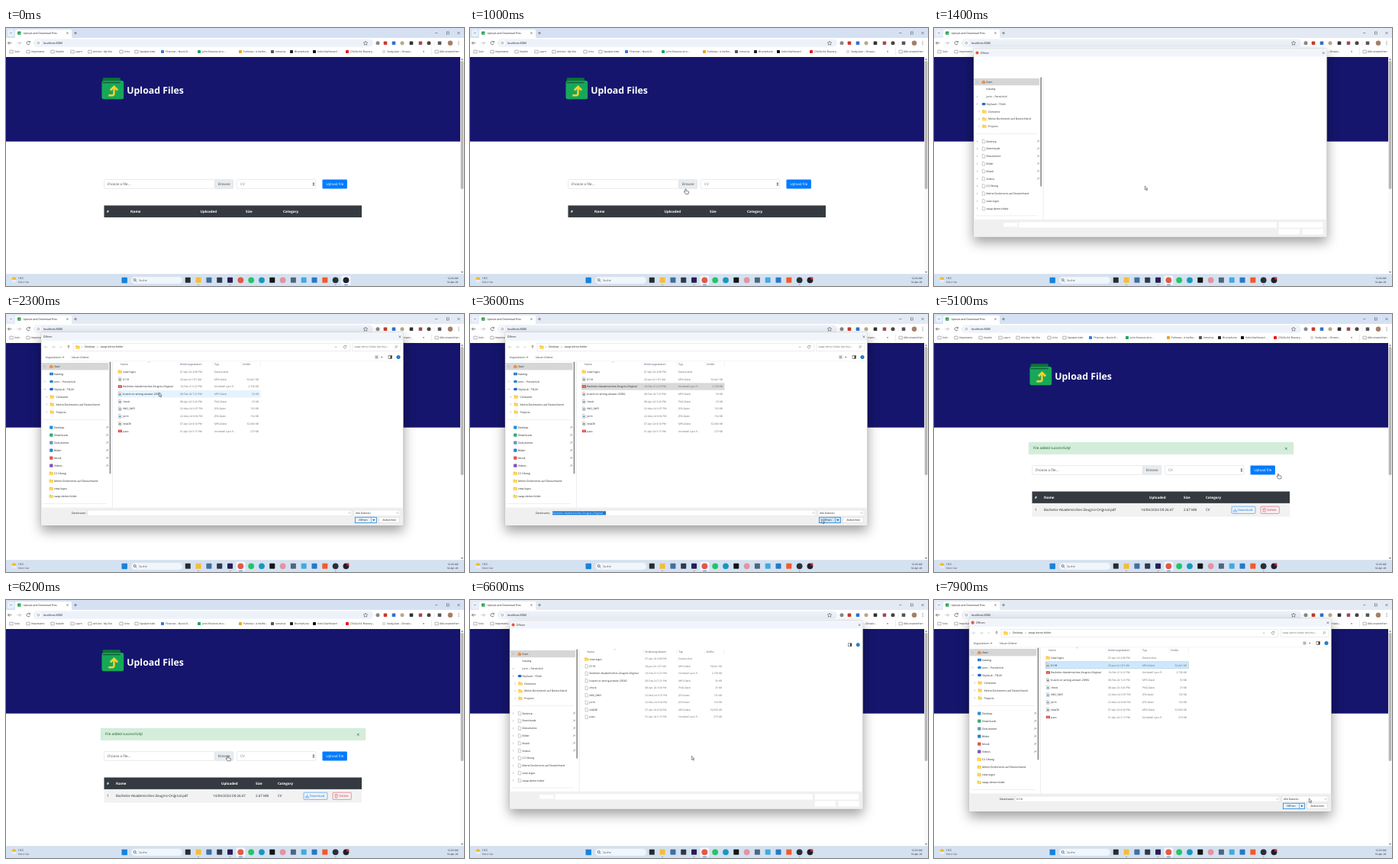
Animation of 600 by 338 pixels, one loop 8000 ms. Source, as an HTML page:

```html
<!DOCTYPE html>
<html lang="de">
<head>
<meta charset="utf-8">
<title>Upload and Download Files</title>
<style>
  html, body { margin: 0; width: 100%; height: 100%; overflow: hidden; background: #fff; }
  svg { display: block; width: 100%; height: 100%; }
  text { font-family: "Open Sans", "Noto Sans", sans-serif; text-rendering: geometricPrecision; white-space: pre; }
  #window { filter: drop-shadow(0 7px 8px rgba(0, 0, 0, .38)); }
</style>
</head>
<body>
<svg id="stage" viewBox="0 0 600 338" xmlns="http://www.w3.org/2000/svg"></svg>
<script>
const LOOP = 8000, STEP = 100;

// Drawing helpers; text is placed by its vertical middle.
const text = (x, y, s, size = 3.5, fill = '#222', extra = '') =>
  `<text x="${x}" y="${y + size * .36}" font-size="${size}" fill="${fill}" ${extra}>${s}</text>`;
const rect = (x, y, w, h, fill, extra = '') =>
  `<rect x="${x}" y="${y}" width="${w}" height="${h}" fill="${fill}" ${extra}/>`;
const dot = (x, y, r, fill, extra = '') => `<circle cx="${x}" cy="${y}" r="${r}" fill="${fill}" ${extra}/>`;
const line = (d, stroke = '#444', w = .6, extra = '') =>
  `<path d="${d}" fill="none" stroke="${stroke}" stroke-width="${w}" ${extra}/>`;
const group = (id, body, extra = '') => `<g id="${id}" ${extra}>${body}</g>`;
const cross = (x, y, r = 1.6, c = '#333', w = .5) => line(`M${x - r} ${y - r}l${2 * r} ${2 * r}m0 ${-2 * r}l${-2 * r} ${2 * r}`, c, w);
const right = (x, y) => line(`M${x - .6} ${y - 1.1}l1.1 1.1l-1.1 1.1`, '#777', .45);
const down = (x, y, c = '#666', r = 1.2) => line(`M${x - r} ${y - r / 2}l${r} ${r}l${r} ${-r}`, c, .5);
const folder = (x, y) => `<path d="M${x - 2.6} ${y - 2.1}h2l.7 .7h2.5v3.6h-5.2z" fill="#f7c331"/>` + rect(x - 2.6, y - .7, 5.2, 2.9, '#ffd75e', 'rx=".4"');
const sheet = (x, y) => `<path d="M${x - 1.7} ${y - 2.4}h2.3l1.2 1.2v3.6h-3.5z" fill="#fff" stroke="#777" stroke-width=".4"/>`;
const square = (x, y, s, fill) => rect(x - s / 2, y - s / 2, s, s, fill, 'rx=".7"');
const bold = 'font-weight="600"', end = 'text-anchor="end"', mid = 'text-anchor="middle"';

function browser() {
  const bookmarks = [
    [11, 'Solo'], [33, 'Importante'], [65, 'Vaivém'], [91, 'Learn'], [114, 'Articles - My Site'],
    [155, 'Univ'], [175, 'Speakerclubs'], [209, 'Finances – Nuvio D...', '#3478e5'],
    [257, 'jorin-finances.stru...', '#1ea362'], [311, 'Parlenza - A melho...', '#f0a51e'],
    [353, 'lumeiras', '#555'], [378, 'BrumaKurse', '#222'], [408, 'Velto Dashboard', '#111'],
    [451, '(74) Ep 64. Bravery...', '#f01616'], [499, 'Study plan – Ortavis...', '#ddd']
  ];
  const tools = [[487, '#888'], [497, '#c63b32'], [508, '#2d73d2'], [519, '#b6a989'], [531, '#2f3137'], [543, '#a34b54'], [554, '#444'], [568, '#555']];
  return rect(0, 0, 600, 14, '#d5e1f3', 'id="strip"') +
    rect(2, 2, 9, 9, '#e9f0fa', 'rx="2.5"') + down(6.5, 6.5, '#333') +
    '<path d="M10 14q2 0 2-2V4q0-2 2-2h70q2 0 2 2v8q0 2 2 2z" fill="#fff"/>' +
    square(17.4, 6.6, 4.4, '#179c52') + line('M16.5 7.5h2v-2', '#f5c72b', .7) +
    text(22.5, 6.6, 'Upload and Download Files', 3.5) + cross(80.5, 6.6, 1.2) +
    line('M89 6.6h4m-2-2v4', '#333', .5) +
    line('M562 6.6h3.4', '#333', .45) + rect(577.2, 5, 3, 3, 'none', 'stroke="#333" stroke-width=".45"') + cross(593, 6.6, 1.5) +
    rect(0, 13, 600, 25, '#fff') +
    line('M7.5 19.7h-5m2-2l-2 2l2 2', '#444', .65) + line('M14.5 19.7h5m-2-2l2 2l-2 2', '#aaa', .65) +
    line('M31 18.3a2.2 2.2 0 1 0 .3 2.2M31.4 16.9v1.8h-1.8', '#444', .65) +
    rect(36, 14.6, 445, 10.2, '#edf2fa', 'rx="5.1"') + dot(42.3, 19.7, 3.4, '#fff') +
    dot(42.3, 19.7, 1.5, 'none', 'stroke="#555" stroke-width=".5"') + text(48.8, 19.7, 'localhost:8080', 3.75) +
    '<path d="M471 17l.8 1.8l2 .2l-1.5 1.3l.5 2l-1.8-1l-1.8 1l.5-2l-1.5-1.3l2-.2z" fill="none" stroke="#444" stroke-width=".5"/>' +
    tools.map(([x, c], i) => i % 3 ? square(x, 19.7, 4.6, c) : dot(x, 19.7, 2.5, c)).join('') +
    line('M561 16.5v6.5', '#cbd8ec', .5) + dot(582, 19.7, 3.2, '#a47f67') +
    [17.7, 19.7, 21.7].map(y => dot(593, y, .5, '#444')).join('') +
    bookmarks.map(([x, s, c]) => (c ? square(x - 4, 31, 4, c)
      : rect(x - 6.2, 29.2, 4.4, 3.7, 'none', 'rx=".4" stroke="#666" stroke-width=".5"')) + text(x, 31, s, 3.3)).join('') +
    text(546, 30.6, '»', 4.5) + line('M557.5 26.5v9', '#cbd8ec', .5) +
    rect(562, 29.2, 4.4, 3.7, 'none', 'rx=".4" stroke="#666" stroke-width=".5"') + text(568, 31, 'Alle Lesezeichen', 3.35);
}

function heads(xs) {
  return ['#', 'Name', 'Uploaded', 'Size', 'Category']
    .map((s, i) => text(xs[i], 240.3, s, 4.5, '#fff', 'font-weight="700"')).join('');
}

function page() {
  const trayIcon = (x, y, c) => line(`M${x - 2} ${y + .5}v1.8h4v-1.8M${x} ${y - 2}v3.2m-1-1l1 1l1-1`, c, .5);
  const added = rect(124, 168, 347, 15.7, '#d4edda', 'rx="1" stroke="#c3e6cb" stroke-width=".3"') +
    text(130, 175.8, 'File added successfully!', 4.55, '#155724') + cross(461.3, 176.3, 1.4, '#4f7059', .8) +
    heads([132, 144, 282, 327, 356]) + rect(128.5, 248, 337.5, 17, '#f2f2f2') + line('M128.5 248.2h337.5m0 16.7h-337.5', '#dee2e6', .4) +
    [[132, '1'], [144, 'Bachelor-Akademisches-Zeugnis-Original.pdf'], [271, '14/04/2024 00:26:47'], [327, '2.67 MB'], [356, 'CV']]
      .map(([x, s]) => text(x, 256.2, s, 4.5, '#212529')).join('') +
    rect(390, 252.2, 31, 9.2, 'none', 'rx="1" stroke="#007bff" stroke-width=".5"') + trayIcon(394.5, 256.8, '#007bff') +
    text(398, 256.8, 'Download', 4.1, '#007bff') +
    rect(428, 252.2, 24.3, 9.2, 'none', 'rx="1" stroke="#dc3545" stroke-width=".5"') +
    line('M430.6 255.2h4m-3.3 0v3.9h2.6v-3.9m-2-.8h1.4', '#dc3545', .5) + text(436.3, 256.8, 'Delete', 4.1, '#dc3545');
  return rect(0, 38, 600, 285, '#fff') + rect(0, 38, 595, 110.7, '#15156d') +
    rect(126.5, 65, 23.5, 12, '#0b6638', 'rx="1.5"') + line('M128 67.3h20', '#138a4b', .7) +
    rect(125.5, 69, 28.7, 24.3, '#16a859', 'rx="2.5"') + line('M126.5 71.5h23', '#0b6638', 1.6) +
    line('M134.3 88.3h5q2.2 0 2.2-2.2v-7.5M136.8 81.5l4.7-4.7l4.7 4.7', '#f8cf32', 2.5) +
    text(158.3, 82, 'Upload Files', 12.3, '#fff', 'font-weight="700"') +
    rect(595, 38, 5, 285, '#fafafa') + rect(595.7, 43, 3.6, 168, '#b8b8b8', 'rx="1.6"') +
    '<path d="M596 41.8l1.5-2l1.5 2zM596 319l1.5 2l1.5-2z" fill="#777"/>' +
    rect(128.7, 198.6, 145, 11.8, '#fff', 'id="field" rx="1" stroke="#ced4da" stroke-width=".5"') +
    rect(273.7, 198.6, 24, 11.8, '#e9ecef', 'id="browse" rx="1" stroke="#ced4da" stroke-width=".4"') +
    text(285.6, 204.5, 'Browse', 4.6, '#495057', mid) +
    text(132.4, 204.5, '', 4.55, '#495057', 'id="chosen"') +
    rect(302.3, 198.6, 103.5, 11.8, '#fff', 'rx="1" stroke="#ced4da" stroke-width=".5"') +
    text(307, 204.5, 'CV', 4.6, '#6c757d') + '<path d="M401.4 203.9l1.5-1.7l1.5 1.7zM401.4 205.1l1.5 1.7l1.5-1.7z" fill="#444"/>' +
    rect(414.5, 198.4, 32.4, 12.1, '#007bff', 'id="submit" rx="1.2"') + text(430.7, 204.5, 'Upload file', 4.6, '#fff', mid) +
    rect(128.5, 232.5, 337.5, 15.6, '#343a40') + group('empty', heads([132, 163, 254.5, 314, 363])) + group('added', added);
}

function taskbar() {
  const colors = ['#292b30', '#f5bd37', '#416e9e', '#2d3948', '#251f50', '#e35a42', '#25c466', '#1998bd',
    '#141414', '#e294a1', '#4b687d', '#43a9df', '#2678c8', '#f15a2b', '#26313a', '#20202a'];
  const round = [5, 6, 7, 9, 14, 15];
  return rect(0, 322.6, 600, 15.4, '#d4e1f1') + line('M0 322.7h600', '#c4d0df', .4) +
    dot(10.5, 329, 2.8, '#f6b52e') + dot(8.8, 331.3, 1.8, '#e6edf5') + dot(11.5, 331.3, 1.9, '#e6edf5') +
    text(15.7, 327.7, '10°C', 3.4) + text(15.7, 333, 'Meist klar', 3.3, '#555') +
    square(155.2, 330.5, 7.4, '#1683dc') + rect(163.7, 325.6, 67.5, 9.8, '#f1f6fc', 'rx="4.9" stroke="#c8d5e5" stroke-width=".4"') +
    dot(168.7, 330, 1.5, 'none', 'stroke="#333" stroke-width=".6"') + line('M169.8 331.2l1.4 1.4', '#333', .6) + text(174, 330.5, 'Suche', 3.8, '#555') +
    rect(0, 324.4, 12, 12.2, '#f0f5fc', 'id="active" rx="1.5"') +
    colors.map((c, i) => {
      const x = 238.3 + i * 13.81;
      return (round.includes(i) ? dot(x, 330.3, 3.9, c) : square(x, 330.3, 7, c)) +
        ([1, 4, 14].includes(i) ? rect(x - 1, 336.1, 2, .7, '#888', 'rx=".3"') : '');
    }).join('') +
    rect(0, 336, 5, .8, '#1877c9', 'id="activeMark" rx=".4"') + dot(447.9, 327.9, 1.7, '#e02b2b', 'id="recording"') +
    text(592.5, 327.9, '12:26 AM', 3.3, '#222', end) + text(592.5, 333.1, '14-Apr-24', 3.3, '#222', end);
}

const files = [
  ['view-logos', '07-Apr-24 4:08 PM', 'Dateiordner', ''],
  ['0118', '20-Jan-24 1:07 AM', 'MP4-Datei', '50,441 KB', '#666'],
  ['Bachelor-Akademisches-Zeugnis-Original', '18-Feb-21 6:23 PM', 'Nordwell Lynx P...', '2,730 KB', '#d93535'],
  ['buzzer-or-wrong-answer-20582', '08-Feb-24 7:23 PM', 'MP3-Datei', '56 KB', '#666'],
  ['check', '08-Apr-24 3:43 PM', 'PNG-Datei', '25 KB', '#3c88c6'],
  ['IMG_0465', '22-Mar-24 6:37 PM', 'JPG-Datei', '132 KB', '#3c88c6'],
  ['jorin', '22-Mar-24 8:34 PM', 'JPG-Datei', '154 KB', '#3c88c6'],
  ['telaD8', '07-Apr-24 8:34 PM', 'MP4-Datei', '32,666 KB', '#666'],
  ['pass', '01-Apr-24 5:15 PM', 'Nordwell Lynx P...', '273 KB', '#d93535']
];
const rowY = i => 75.6 + i * 9.72;

function tree() {
  const top = [['Start', '#e9904a'], ['Katalog', '#2f83d0'], ['Jorin – Persönlich', '#2787d9'], ['SkyVault - TELM', '#2467bd'],
    ['Clemente'], ['Meine Dockments auf Deutschland'], ['Projects']];
  const quick = [['Desktop', '#2c8fd6'], ['Downloads', '#37a978'], ['Dokumente', '#6792b8'], ['Bilder', '#2d80d2'], ['Musik', '#df5547'],
    ['Videos', '#7855b5'], ['C2 Übung'], ['Meine Dockments auf Deutschland'], ['view-logos'], ['swap-demo-folder']];
  let all = '', ready = '', loading = '';
  top.forEach(([s, c], i) => {
    const y = 68.6 + i * 9.95, sub = i > 3 ? 2.6 : 0;
    all += text(63 + sub, y, s, 3.5) + (i === 3 ? down(50.7, y) : i === 1 ? '' : right(50.7 + sub, y));
    const icon = c ? (i ? rect(57, y - 1.7, 5, 3.4, c, `rx="${i > 1 ? 1.7 : .5}"`)
      : `<path d="M56.8 ${y}l2.5-2.4l2.5 2.4v2.2h-5z" fill="${c}"/>`) : folder(60.3, y);
    if (i === 1 || i === 2) ready += icon; else all += icon;
  });
  quick.forEach(([s, c], i) => {
    const y = 148.6 + i * 10.02;
    all += text(63, y, s, 3.5) + (i < 6 ? line(`M131 ${y + 1.3}l1-1m-.5-1.5l1.8 1.8m-.8-2.4l1.5 1.5l-1.1 .4`, '#666', .5) : '');
    ready += c ? square(59.3, y, 4.3, c) : folder(59.3, y);
    loading += sheet(59.3, y) + right(50.7, y);
  });
  return rect(46.3, 64, 88, 9.4, '#d6d6d6') + all + line('M49 138.5h83m0 110h-83', '#dedede', .5) +
    rect(135.6, 62.5, 1.7, 147, '#8d8d8d', 'rx=".8"') + line('M139.5 62.5v191', '#e4e8ed', .7) +
    group('treeReady', ready) + group('treeLoading', loading);
}

function dialog() {
  const cols = [[153.3, ''], [228, ''], [273, ''], [331, end]];
  const icon = (f, y) => !f[4] ? folder(149.3, y) : f[4] === '#d93535' ? rect(146.8, y - 1.7, 5.2, 3.4, f[4], 'rx=".4"') +
    line(`M147.6 ${y}h3.6`, '#fff', .6) : sheet(149.3, y) + square(149.3, y + .4, 2, f[4]);
  const list = rect(146, 0, 187.5, 9.3, '#e5f3ff', 'id="hover"') + rect(146, 0, 187.5, 9.3, '#cce8ff', 'id="selected"') +
    [[150, 'Name'], [228, 'Änderungsdatum'], [273, 'Typ'], [310, 'Größe']].map(([x, s]) => text(x, 65.6, s, 3.5, '#44546a')).join('') +
    line('M226 62.5v6.5M271 62.5v6.5M308 62.5v6.5M333.5 62.5v6.5', '#ddd', .4) + line('M186 63.2l1.2-1l1.2 1', '#777', .4) +
    files.map((f, i) => cols.map(([x, a], k) => text(x, rowY(i), f[k], k ? 3.35 : 3.45, k ? '#666' : '#222', a)).join('')).join('') +
    group('listReady', files.map((f, i) => icon(f, rowY(i))).join('')) +
    group('listLoading', files.map((f, i) => i ? sheet(149.3, rowY(i)) : folder(149.3, rowY(i))).join('')) +
    rect(501, 54.6, 4.4, 3.8, '#fff', 'stroke="#333" stroke-width=".5"') + rect(503.5, 54.6, 1.9, 3.8, '#333') +
    dot(514, 56.5, 2.5, '#1176c5') + text(514, 56.5, '?', 3.3, '#fff', mid);
  const box = (x, y, w, h) => rect(x, y, w, h, '#fff', 'stroke="#d0d0d0" stroke-width=".4"');
  const ready = line('M54.5 43.2h-4m1.5-1.5l-1.5 1.5l1.5 1.5M60 43.2h4m-1.5-1.5l1.5 1.5l-1.5 1.5', '#aaa', .5) + down(71.5, 43.2, '#888') +
    line('M82 45.2v-4m-1.5 1.5l1.5-1.5l1.5 1.5', '#333', .5) + box(88, 38.3, 363, 10) + folder(94, 43.2) + right(99.3, 43.2) +
    text(103, 43.2, 'Desktop', 3.5) + right(120, 43.2) + text(123.7, 43.2, 'swap-demo-folder', 3.5) + down(432, 43.2) +
    line('M445.5 42a1.8 1.8 0 1 0 .3 1.8m0-2.8v1.3h-1.3', '#555', .5) + box(454, 38.3, 63, 10) +
    text(456.3, 43.2, 'swap-demo-folder durchsu...', 3.35, '#666') + dot(511.5, 42.7, 1.2, 'none', 'stroke="#555" stroke-width=".4"') + line('M510.7 43.6l-1.3 1.3', '#555', .4) +
    text(51.7, 56.5, 'Organisieren', 3.5, '#24364e') + '<path d="M74 55.9h2.4l-1.2 1.4z" fill="#444"/>' + text(86, 56.5, 'Neuer Ordner', 3.5, '#24364e') +
    line('M483.5 55h4m0 1.5h-4m0 1.5h4', '#555', .6) + '<path d="M491 55.9h2.4l-1.2 1.4z" fill="#444"/>' + line('M46 61.8h474.5', '#e6e6e6', .4) +
    text(104.8, 260.8, 'Dateiname:', 3.5, '#222', end) + box(107, 257, 346, 7.8) + down(450, 260.8) +
    rect(108, 258.3, 70, 5, '#1978d2', 'id="marked"') + text(108.2, 260.8, '', 3.45, '#222', 'id="filename"') +
    box(456, 257, 60, 7.8) + text(458, 260.8, 'Alle Dateien', 3.5) + down(513, 260.8) +
    rect(457.3, 266.2, 28, 7.5, '#e8f2fb', 'id="open" stroke="#0078d7" stroke-width=".7"') + line('M478.5 266.2v7.5', '#0078d7', .4) +
    text(468, 270, 'Öffnen', 3.5, '#222', mid) + '<path d="M480.3 269.2h3l-1.5 1.8z" fill="#222"/>' +
    rect(488.7, 266.2, 27, 7.5, '#fdfdfd', 'stroke="#c9c9c9" stroke-width=".4"') + text(502.2, 270, 'Abbrechen', 3.5, '#222', mid);
  const blank = [[86, 258, 19, 5.5], [107, 257, 346, 7.5], [456, 257, 59, 7.5], [456, 266.3, 28, 7.5], [487.5, 266.3, 28, 7.5]]
    .map(b => rect(...b, '#fff')).join('');
  return group('window', rect(46, 24, 474.5, 253, '#fff', 'rx="1" stroke="#aaa" stroke-width=".4"') +
    rect(46.2, 24.2, 474.1, 10.6, '#f1f5fb') + group('titleIcon', dot(50.7, 29.7, 2.1, '#e35a42')) +
    text(55, 29.8, 'Öffnen', 3.6, '#222', 'id="title"') + cross(516, 29.8, 1.4) +
    tree() + rect(46.2, 253.5, 474.1, 23.3, '#f0f0f0') + group('blank', blank) + group('list', list) + group('ready', ready));
}

const arrow = group('arrow', '<path d="M0 0v5l1.2-1.1l.9 2l.9-.4l-.9-1.9h1.6z" fill="#fff" stroke="#111" stroke-width=".45"/>');
const hand = group('hand', '<path d="M-.6 .4q.7-.8 1.3 0v2l3 .7q.6 .2 .5 1l-.6 2.5h-3.5l-2-2.7q-.4-.8 .4-.9l.9 .6z" fill="#fff" stroke="#111" stroke-width=".5"/>');
document.getElementById('stage').innerHTML = browser() + page() + taskbar() + dialog() + group('pointer', arrow + hand);

const $ = id => document.getElementById(id);
const show = (id, on) => { $(id).style.display = on ? '' : 'none'; };
const set = (id, attrs) => Object.entries(attrs).forEach(([k, v]) => $(id).setAttribute(k, v));

// time, x, y
const path = [[0, 446, 329], [300, 440, 322], [800, 300, 222], [1100, 276.3, 207], [1700, 276.3, 207], [2400, 196, 97],
  [2900, 192, 96], [3400, 460.7, 269], [3700, 460.7, 269], [4400, 432.5, 208.5], [4900, 432.5, 208.5],
  [5100, 451, 209.3], [5300, 448, 210], [6100, 290.3, 204.3], [6700, 290.3, 204.3], [7100, 186, 86], [7400, 186, 86], [7900, 491.3, 260]];

function pointAt(t) {
  const i = Math.max(1, path.findIndex(p => p[0] >= t));
  const [a, b] = [path[i - 1], path[i]];
  const p = Math.min(1, (t - a[0]) / (b[0] - a[0])), e = p * p * (3 - 2 * p);
  return [a[1] + (b[1] - a[1]) * e, a[2] + (b[2] - a[2]) * e];
}

function draw(t) {
  const [x, y] = pointAt(t);
  const second = t >= 5500, begin = second ? 6400 : 1300;
  const opened = t >= begin && (second || t < 3700);
  const ready = opened && t >= begin + 300, listed = opened && t >= begin + 200;
  const inactive = t >= begin - 100 && (second || t < 3700);
  const inside = (l, r) => !opened && x > l && x < r && y > 198 && y < 211;
  const overBrowse = inside(273, 298), overSubmit = inside(414, 447);

  set('strip', { fill: inactive ? '#e4eaf4' : '#d5e1f3' });
  const focused = t >= 3700 && t < 5000, uploaded = t >= 5000;
  $('chosen').textContent = focused ? files[2][0] + '.pdf' : 'Choose a file...';
  set('field', { stroke: focused ? '#80bdff' : '#ced4da', 'stroke-width': focused ? .9 : .5 });
  set('browse', { stroke: focused ? '#80bdff' : '#ced4da' });
  set('submit', { fill: overSubmit ? '#0069d9' : '#007bff' });
  show('empty', !uploaded);
  show('added', uploaded);

  const recording = t >= 300, icon = recording ? 307.4 : 445.4;
  set('active', { x: icon - 6 });
  set('activeMark', { x: icon - 2.5 });
  show('recording', recording);

  show('window', opened);
  set('window', { transform: ready ? '' : 'translate(52 27) scale(.975) translate(-46 -24)' });
  for (const id of ['ready', 'treeReady', 'listReady']) show(id, ready);
  for (const id of ['blank', 'treeLoading', 'listLoading']) show(id, !ready);
  show('list', listed);
  const hasIcon = second || !ready;
  show('titleIcon', hasIcon);
  set('title', { x: hasIcon ? 55 : 48.7 });

  const picked = t >= 7200 ? 1 : t >= 2800 && t < 3700 ? 2 : -1;
  const marked = picked === 2 && t >= 3100;
  const row = Math.round((y - rowY(0)) / 9.72);
  const hovering = ready && x > 146 && x < 333 && row >= 0 && row < files.length;
  show('hover', hovering);
  set('hover', { y: rowY(row) - 4.7 });
  show('selected', picked >= 0);
  set('selected', { y: rowY(Math.max(0, picked)) - 4.7, fill: marked ? '#d9d9d9' : '#cce8ff',
    stroke: picked === 1 ? '#8a9e78' : 'none', 'stroke-width': .4, 'stroke-dasharray': '1 .6' });
  show('marked', marked);
  $('filename').textContent = picked < 0 ? '' : files[picked][0];
  set('filename', { fill: marked ? '#fff' : '#222' });
  set('open', { fill: x > 457 && x < 486 && y > 266 ? '#cce4f7' : '#e8f2fb' });

  const asHand = overBrowse && t < begin - 100 || overSubmit || t >= 5000 && t < 5300;
  show('pointer', t >= 100);
  show('hand', asHand);
  show('arrow', !asHand);
  set('pointer', { transform: `translate(${x} ${y})` });
}

const start = performance.now();
function tick() {
  const t = (performance.now() - start) % LOOP;
  draw(Math.floor(t / STEP) * STEP);
  requestAnimationFrame(tick);
}
tick();
</script>
</body>
</html>
```
